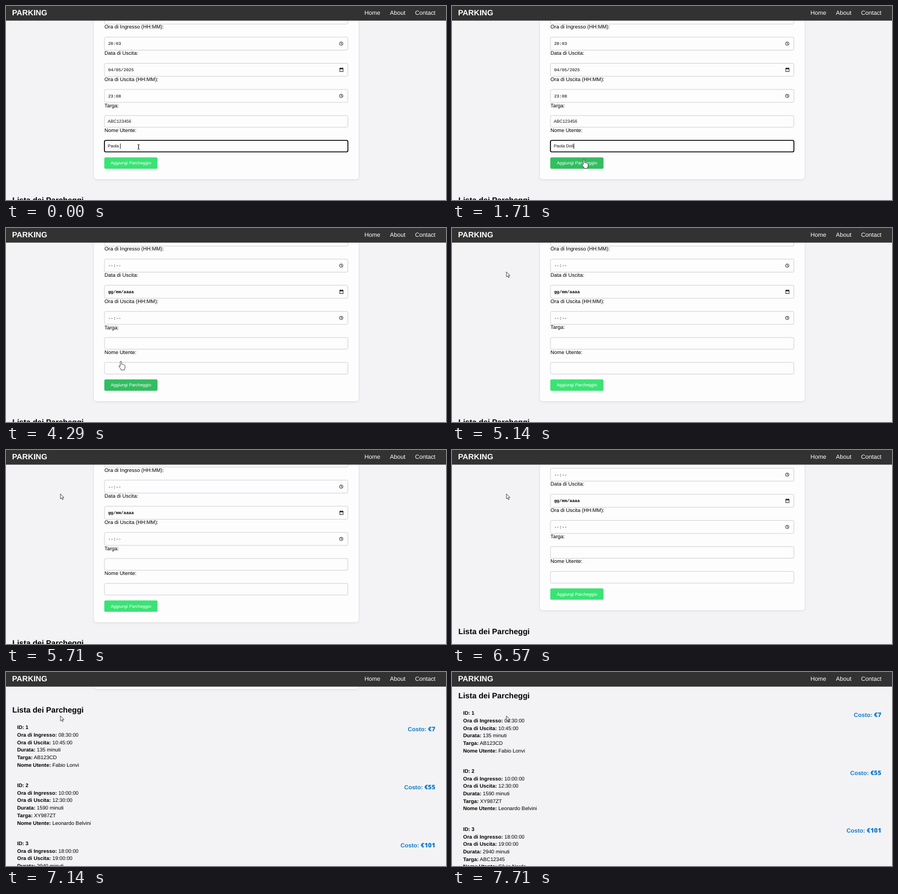
These frames come from a looping animation (800x354 px, 8000 ms). An HTML page:

```html
<!DOCTYPE html>
<html lang="it">
<head>
<meta charset="utf-8">
<title>Parking</title>
<style>
html, body { margin: 0; width: 100%; height: 100%; overflow: hidden; background: #f3f3f5; }
svg { display: block; font-family: "Liberation Sans", Arial, sans-serif; text-rendering: geometricPrecision; }
.label { font-size: 9.44px; }
.value { font-size: 7.9px; fill: #111; white-space: pre; }
.mono { font: 7.8px "Liberation Mono", "DejaVu Sans Mono", monospace; }
.field { fill: #fdfdfe; stroke: #cfd0d5; }
.card { fill: #fdfdfe; filter: drop-shadow(0 1px 2px rgba(0,0,0,.1)); }
.icon { fill: none; stroke: #111; stroke-width: .9; }
.cost { font-size: 10.7px; font-weight: bold; fill: #117bc8; text-anchor: end; }
.sum { font: 800 11.3px "Open Sans", "Noto Sans", sans-serif; }
.nav { font-size: 10.75px; fill: #fff; text-anchor: end; }
.button { font-size: 7.95px; fill: #fff; text-anchor: middle; }
.cursor { stroke: #222; stroke-width: .8; fill: #fff; stroke-linejoin: round; }
.b { font-weight: bold; }
</style>
</head>
<body>
<svg id="stage" width="800" height="354" viewBox="0 0 800 354"></svg>
<script>
const text = (x, y, cls, s, id = '') => `<text x="${x}" y="${y}" class="${cls}" id="${id}">${s}</text>`;
const box = (y, h, attrs) => `<rect x="179" y="${y}" width="442.6" height="${h}" rx="2.5" ${attrs}/>`;

const icons = {
  clock: '<circle r="3.1"/><path d="M0-2v2.2l1.5 1"/>',
  calendar: '<rect x="-2.6" y="-2.7" width="6" height="6"/><path d="M-2.6-1.9h6" stroke-width="1.8"/><path d="M-1.2-4v1.5M2.2-4v1.5"/>'
};

const rows = [
  { label: 'Ora di Ingresso (HH:MM):', value: '20:03', blank: '--:--', icon: 'clock' },
  { label: 'Data di Uscita:', value: '04/05/2025', blank: 'gg/mm/aaaa', icon: 'calendar' },
  { label: 'Ora di Uscita (HH:MM):', value: '23:08', blank: '--:--', icon: 'clock' },
  { label: 'Targa:', value: 'ABC123456' },
  { label: 'Nome Utente:', value: '' }
];

function buildForm() {
  let frame = box(9, 24, 'class="field"'), filled = '', blank = '', y = 41.4, top, mid;
  for (const { label, value, blank: hint, icon } of rows) {
    const h = icon ? 23.7 : 21.3;
    top = y + 15.4;
    mid = top + h / 2;
    frame += text(179, y, 'label', label) + box(top, h, 'class="field"');
    if (icon) {
      frame += `<g class="icon" transform="translate(609.5 ${mid})">${icons[icon]}</g>`;
      filled += text(185.7, mid + 2.8, 'mono', value);
      blank += text(185.7, mid + 2.8, icon === 'calendar' ? 'mono b' : 'mono', hint);
    } else {
      filled += text(185, mid + 2.6, 'value', value, value ? '' : 'user');
    }
    y = top + h + 8.6;
  }
  filled += `<path id="caret" d="M0 ${mid - 4.8}v9.5" stroke="#000" stroke-width=".9"/>` +
    box(top, 21.1, 'fill="none" stroke="#000" stroke-width="1.6"');
  return `<rect class="card" x="160" y="-300" width="481" height="616" rx="5"/>${frame}
    <g id="filled">${filled}</g><g id="blank">${blank}</g>
    <rect id="button" x="178.7" y="276.2" width="96.8" height="20.8" rx="2.5"/>
    ${text(227.2, 289.4, 'button', 'Aggiungi Parcheggio')}`;
}

const parked = [
  ['08:30:00', '10:45:00', 135, 'AB123CD', 'Fabio Lonvi', 7],
  ['10:00:00', '12:30:00', 1590, 'XY987ZT', 'Leonardo Belvini', 55],
  ['18:00:00', '19:00:00', 2940, 'ABC12345', 'Silvia Nardo', 101]
];

function buildItem([enter, leave, mins, plate, user, cost], i) {
  const y = 389.4 + i * 105.8;
  const lines = [['ID: ' + (i + 1), ''], ['Ora di Ingresso:', enter], ['Ora di Uscita:', leave],
    ['Durata:', mins + ' minuti'], ['Targa:', plate], ['Nome Utente:', user]];
  return lines.map(([k, v], n) =>
    text(20.3, y + n * 13.68, 'label', `<tspan class="b">${k}</tspan> ${v}`)).join('') +
    text(780.6, y + 3.6, 'cost', `Costo: <tspan class="sum">€${cost}</tspan>`);
}

document.getElementById('stage').innerHTML = `
  <g id="page">${buildForm()}
    <text x="11.5" y="359.3" font-size="14.17" class="b">Lista dei Parcheggi</text>
    ${parked.map(buildItem).join('')}
  </g>
  <rect width="800" height="26.7" fill="#323232"/>
  <text x="11" y="17.3" font-size="14.1" class="b" fill="#fff">PARKING</text>
  ${text(780.8, 16.3, 'nav', 'Home<tspan dx="17.6">About</tspan><tspan dx="17.6">Contact</tspan>')}
  <g id="mouse">
    <path id="beam" d="M-2-4.5q2 0 2 1.2v6.6q0 1.2-2 1.2M2-4.5q-2 0-2 1.2v6.6q0 1.2 2 1.2" fill="none" stroke="#222" stroke-width=".9"/>
    <path id="hand" class="cursor" d="M-1.2 8V1q0-1.3 1.2-1.3T1.2 1v4.2q2-.6 2.3.6 1.9-.4 2.2.7 1.8-.2 1.8 1.3v3.2q0 2-1.2 3.3v1.2H0v-1.4L-3.3 9.6q-.8-1.4.3-1.9.8-.3 1.8 1.1z"/>
    <path id="arrow" class="cursor" d="M0 0v9.2l2.1-1.9 1.5 3.3 1.5-.7-1.5-3.2h2.7z"/>
  </g>`;

const LOOP = 8000, TICKS = 56; // the picture is renewed 7 times a second
const TYPED = 9, HOVER = 11, SENT = 28, LEFT = 31;
const NAME = 'Paola Doli';

const el = id => document.getElementById(id);
const progress = (n, from, to) => Math.min(1, Math.max(0, (n - from) / (to - from)));
const lerp = (a, b, u) => a + (b - a) * u;
const smooth = u => u * u * (3 - 2 * u);
const show = (id, on) => el(id).setAttribute('visibility', on ? 'inherit' : 'hidden');
const place = (id, x, y) => el(id).setAttribute('transform', `translate(${x} ${y})`);

function scrollAt(n) {
  const nudge = n < 40 ? 0 : 1.8;
  return nudge + 309.5 / (1 + Math.exp((48.08 - n) / 0.807));
}

function draw(n) {
  place('page', 0, -scrollAt(n));

  const down = smooth(progress(n, 8, 14));
  const away = progress(n, 27, 33) ** 2.2;
  place('mouse', lerp(lerp(241, 239.5, down), 99, away), lerp(lerp(257, 289, down), 80, away));
  show('beam', n < HOVER);
  show('hand', n >= HOVER && n < LEFT);
  show('arrow', n >= LEFT);
  el('button').setAttribute('fill', n >= HOVER && n < LEFT ? '#33bd60' : '#3ae374');

  const user = el('user');
  user.textContent = NAME.slice(0, 6 + Math.floor(n / 2));
  place('caret', 185.6 + user.getComputedTextLength(), 0);
  show('caret', n < TYPED || Math.floor((n - TYPED) / 3.5) % 2 === 0);
  el('filled').setAttribute('display', n < SENT ? 'inline' : 'none');
  show('blank', n >= SENT);
}

let shown = -1;
function loop() {
  const tick = Math.floor((performance.now() + 6) % LOOP / LOOP * TICKS);
  if (tick !== shown) draw(shown = tick);
  requestAnimationFrame(loop);
}
loop();
</script>
</body>
</html>
```
